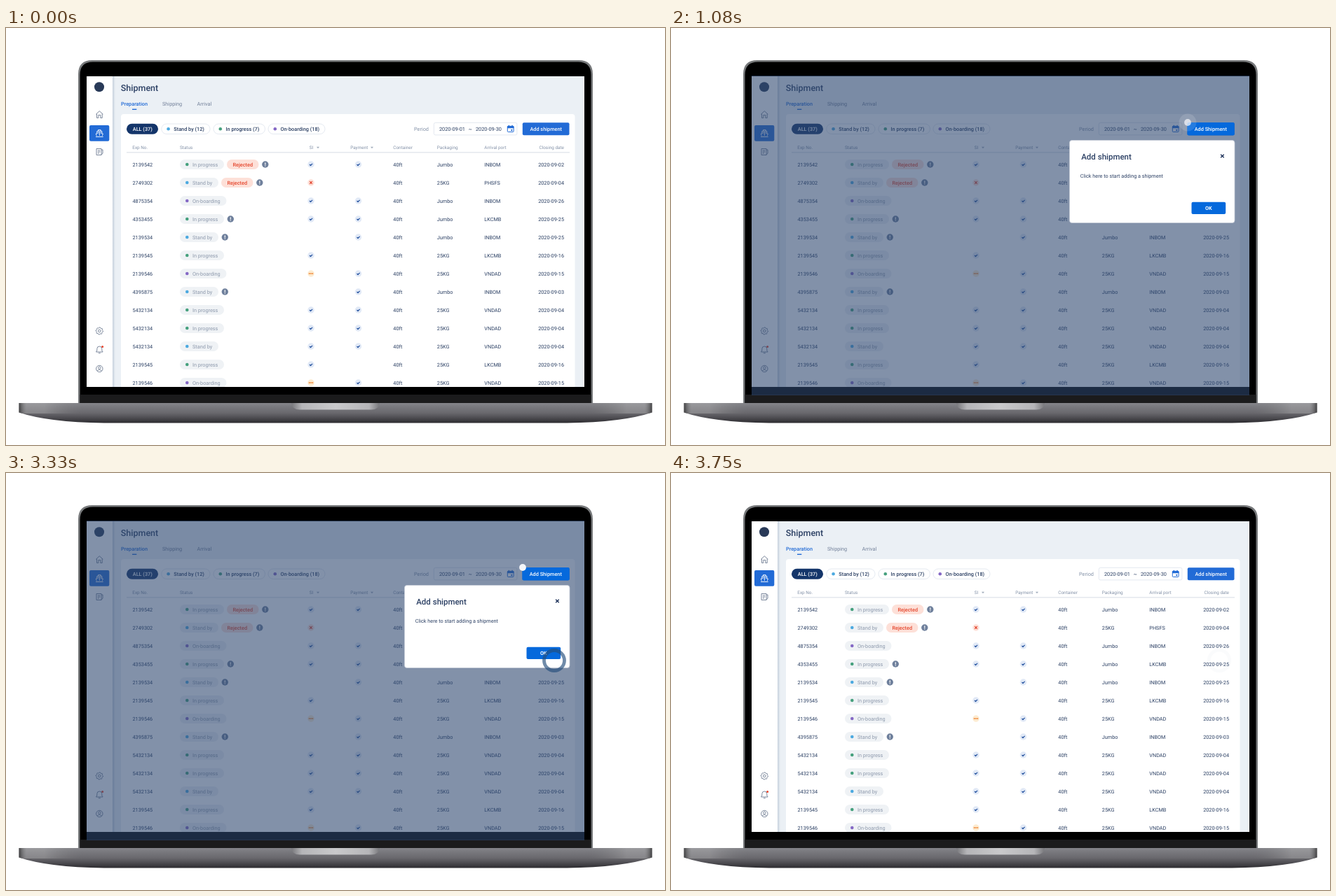
Animation, 940 px wide and 596 px high, one loop 5 s. Source, as an HTML page:

```html
<!DOCTYPE html>
<html lang="en">
<head>
<meta charset="utf-8">
<title>Shipment</title>
<style>
html, body { margin: 0; width: 100%; height: 100%; overflow: hidden; background: #fff; }
svg { display: block; width: 940px; height: 596px; }
text { font-family: Roboto, sans-serif; font-size: 7.3px; text-rendering: geometricPrecision; white-space: pre; }
</style>
</head>
<body>
<svg id="stage" viewBox="0 0 940 596">
  <defs>
    <linearGradient id="metal" x2="0" y2="1">
      <stop offset="0" stop-color="#85858a"/><stop offset=".15" stop-color="#7b7b80"/>
      <stop offset=".5" stop-color="#69686d"/><stop offset=".72" stop-color="#504f54"/>
      <stop offset="1" stop-color="#2d2c30"/>
    </linearGradient>
    <linearGradient id="sheen">
      <stop offset="0" stop-color="#222" stop-opacity=".65"/><stop offset=".012" stop-color="#ccc" stop-opacity=".3"/>
      <stop offset=".04" stop-color="#ccc" stop-opacity=".3"/><stop offset=".1" stop-color="#888" stop-opacity="0"/>
      <stop offset=".9" stop-color="#888" stop-opacity="0"/><stop offset=".96" stop-color="#ccc" stop-opacity=".3"/>
      <stop offset=".988" stop-color="#ccc" stop-opacity=".3"/><stop offset="1" stop-color="#222" stop-opacity=".65"/>
    </linearGradient>
    <linearGradient id="notch">
      <stop offset="0" stop-color="#77777b"/><stop offset=".12" stop-color="#b5b5b8"/>
      <stop offset=".5" stop-color="#c9c9cb"/><stop offset=".88" stop-color="#b5b5b8"/>
      <stop offset="1" stop-color="#77777b"/>
    </linearGradient>
    <linearGradient id="shade">
      <stop offset="0" stop-color="#c6d0dc"/><stop offset="1" stop-color="#ebf0f5"/>
    </linearGradient>
    <clipPath id="screen"><rect x="115" y="69" width="710" height="444"/></clipPath>
  </defs>
  <path d="M103 536V66Q103 46 123 46H817Q837 46 837 66V536Z" fill="#77797b"/>
  <path d="M105.5 536V67Q105.5 48.5 124 48.5H816Q834.5 48.5 834.5 67V536Z"/>
  <rect x="105.5" y="524" width="729" height="12" fill="#1b1b1c"/>
  <g id="base">
    <path id="body" d="M18.5 536H921.5V549.5Q880 563.5 800 564.5H140Q60 563.5 18.5 549.5Z" fill="url(#metal)"/>
    <path d="M18.5 536H921.5V549.5L917 551H23L18.5 549.5Z" fill="url(#sheen)"/>
    <path d="M407 536H533Q532 545.5 521 545.5H419Q408 545.5 407 536Z" fill="url(#notch)"/>
  </g>
  <g id="app" clip-path="url(#screen)"></g>
  <rect id="dim" x="115" y="68" width="710" height="457" fill="#304870"/>
  <g id="tip"></g>
  <circle id="tap" cx="782" cy="268" fill="none" stroke="#244e7c" stroke-width="4.8"/>
</svg>
<script>
const $ = id => document.getElementById(id);
const BLUE = '#226bd6', INK = '#2c4064', MUTED = '#8492a8', NAVY = '#14356a';

const rect = (x, y, w, h, r, fill, more = '') =>
  `<rect x="${x}" y="${y}" width="${w}" height="${h}" rx="${r}" fill="${fill}" ${more}/>`;
const dot = (x, y, r, fill, more = '') =>
  `<circle cx="${x}" cy="${y}" r="${r}" fill="${fill}" ${more}/>`;
const line = (d, color, w = 0.9) =>
  `<path d="${d}" fill="none" stroke="${color}" stroke-width="${w}" stroke-linejoin="round"/>`;
const text = (x, y, s, fill = INK, size = 7.3, weight = 400, anchor = 'start') =>
  `<text x="${x}" y="${y}" fill="${fill}" font-weight="${weight}" text-anchor="${anchor}" style="font-size:${size}px">${s}</text>`;
const cross = (x, y, r, color, w) =>
  line(`M${x - r} ${y - r}l${2 * r} ${2 * r}m0 ${-2 * r}l${-2 * r} ${2 * r}`, color, w);

const STATUS = {
  P: ['In progress', 63, '#45a07d'],
  S: ['Stand by', 55, '#4ba9e0'],
  O: ['On-boarding', 66.5, '#8468c5']
};

// number, status, flags (r: rejected, i: info), SI, payment, packaging, port, day
const ROWS = `2139542 P ri v v Jumbo INBOM 02
2749302 S ri x - 25KG PHSFS 04
4875354 O - v v Jumbo INBOM 26
4353455 P i v v Jumbo LKCMB 25
2139534 S i - v Jumbo INBOM 25
2139545 P - v - 25KG LKCMB 16
2139546 O - m v 25KG VNDAD 15
4395875 S i - v Jumbo INBOM 03
5432134 P - v v 25KG VNDAD 04
5432134 P - v v 25KG VNDAD 04
5432134 S - v v 25KG VNDAD 04
2139545 P - v - 25KG LKCMB 16
2139546 O - m v 25KG VNDAD 15`.split('\n').map(r => r.split(' '));

function mark(kind, x, y) {
  if (kind === 'v') return dot(x, y, 4.7, '#e1e9f6') + line(`M${x - 2} ${y}l1.5 1.5l2.6 -2.7`, '#24529f', 1.2);
  if (kind === 'x') return dot(x, y, 4.7, '#fde0d8') + cross(x, y, 1.8, '#e23f28', 1.2);
  if (kind === 'm') return dot(x, y, 4.7, '#fdebd0') + [-2.3, 0, 2.3].map(d => dot(x + d, y, 0.9, '#ee8030')).join('');
  return '';
}

function row([no, status, flags, si, pay, pack, port, day], i) {
  const y = 195 + 26 * i, base = y + 2.6;
  const [label, width, color] = STATUS[status];
  let end = 248 + width;
  let out = text(180.5, base, no) + rect(248, y - 7, width, 14, 7, '#eff2f5') +
    dot(258.3, y, 2.3, color) + text(266, base, label, '#8d99ac');
  if (flags.includes('r')) {
    out += rect(end + 4, y - 7, 45.5, 14, 7, '#fde0d8') +
      text(end + 26.8, base, 'Rejected', '#e5472e', 7.3, 500, 'middle');
    end += 49.5;
  }
  if (flags.includes('i')) {
    out += dot(end + 9.3, y, 4.7, '#6f809c') + rect(end + 8.7, y - 2.6, 1.2, 3.2, 0, '#fff') + dot(end + 9.3, y + 2, 0.7, '#fff');
  }
  return out + mark(si, 435, y) + mark(pay, 502.5, y) + text(552.3, base, '40ft') +
    text(614.8, base, pack) + text(682.3, base, port) + text(796, base, '2020-09-' + day, INK, 7.3, 400, 'end');
}

function chip(x, w, label, color) {
  return rect(x, 137, w, 14.5, 7.2, '#fff', 'stroke="#dde4ec" stroke-width=".8"') +
    dot(x + 9.8, 144.3, 2.3, color) + text(x + 17.5, 147, label, INK, 7.3, 500);
}

function sidebar() {
  const g = '#6f7c92';
  let teeth = '';
  for (let k = 0; k <= 32; k++) {
    const a = k * Math.PI / 16, r = k % 4 < 2 ? 5.2 : 4.2;
    teeth += `${k ? 'L' : 'M'}${(133.3 + r * Math.cos(a)).toFixed(2)} ${(433 + r * Math.sin(a)).toFixed(2)}`;
  }
  return rect(152, 69, 4, 444, 0, 'url(#shade)') + rect(115, 69, 37, 444, 0, '#fff') +
    dot(133, 84.3, 7, '#293a58') +
    line('M128.3 123.3L133.3 118.7L138.3 123.3M129.5 122.5V128.5H131.8V124.5H134.8V128.5H137.2V122.5', g) +
    rect(119, 139, 28.3, 22.8, 2, BLUE) +
    line('M129.8 150V147.5H136.8V150M131.5 147.5V145.6H135.1V147.5M129.3 154.2L128.3 151L133.3 149.2L138.3 151L137.3 154.2M133.3 149.5V154M128 155.5H138.6', '#fff') +
    line('M129 172.5H136V181.5H129ZM136 174H138V179L135.8 181.5M130.8 175H134.3M130.8 177H134.3M130.8 179H133', g) +
    line(teeth, g) + dot(133.3, 433, 1.8, 'none', `stroke="${g}" stroke-width=".9"`) +
    line('M128.5 463H138.1L136.8 461V458.5A3.5 3.5 0 0 0 129.8 458.5V461ZM131.8 464.7H134.8', g) +
    dot(137.6, 455.5, 1.5, '#e8452c') +
    dot(133.3, 487, 4.7, 'none', `stroke="${g}" stroke-width=".9"`) +
    dot(133.3, 485.7, 1.7, 'none', `stroke="${g}" stroke-width=".9"`) +
    line('M130 490.2Q133.3 486.8 136.6 490.2', g);
}

function header() {
  const h = (x, s, anchor) => text(x, 173.2, s, MUTED, 6.4, 400, anchor);
  const arrow = x => `<path d="M${x - 2} 169.7h4l-2 2.6z" fill="#a3aebd"/>`;
  return h(180.3, 'Exp No.') + h(248, 'Status') + h(432.7, 'SI') + arrow(445) +
    h(491.2, 'Payment') + arrow(522) + h(552.3, 'Container') + h(614.8, 'Packaging') +
    h(682.3, 'Arrival port') + h(796, 'Closing date', 'end') + rect(172, 177.5, 632, 0.8, 0, '#ccd4de');
}

function filters() {
  return rect(172, 136.8, 45, 15, 7.5, NAVY) + text(194.8, 147, 'ALL (37)', '#fff', 7.3, 500, 'middle') +
    chip(221.8, 69.2, 'Stand by (12)', STATUS.S[2]) + chip(296, 73.5, 'In progress (7)', STATUS.P[2]) +
    chip(374, 81, 'On-boarding (18)', STATUS.O[2]) +
    text(582, 146.8, 'Period', MUTED) +
    rect(610.4, 135.4, 118.5, 17.5, 2, '#fff', 'stroke="#dde4ec" stroke-width=".8"') +
    text(618, 146.8, '2020-09-01') + text(659.7, 146.8, '~') + text(670, 146.8, '2020-09-30') +
    rect(715.3, 140.3, 8.8, 8.2, 1, '#fff', `stroke="${BLUE}"`) + rect(715, 140, 9.4, 3.2, 1, BLUE) +
    rect(716.7, 138.8, 1.2, 2, 0, BLUE) + rect(721.5, 138.8, 1.2, 2, 0, BLUE) + rect(720.3, 145, 2, 2, 0, BLUE) +
    rect(736.8, 135.2, 66.7, 18, 2, BLUE) + text(770.2, 147, 'Add shipment', '#fff', 7.3, 500, 'middle');
}

$('app').innerHTML = rect(115, 69, 710, 444, 0, '#ebf0f5') + sidebar() +
  text(163.8, 90.3, 'Shipment', INK, 12.5, 500) +
  text(164, 111.4, 'Preparation', BLUE, 7.3, 500) + rect(180, 115.6, 6.3, 1.4, 0, BLUE) +
  text(223, 111.4, 'Shipping', '#73819a') + text(272.5, 111.4, 'Arrival', '#73819a') +
  rect(164, 123, 647.5, 400, 4, '#fff') + filters() + header() + ROWS.map(row).join('');

const ACTION = '#0569dc';
$('tip').innerHTML = rect(736.3, 135, 67.5, 18.4, 2, ACTION) +
  text(769.8, 147, 'Add Shipment', '#fff', 7.3, 500, 'middle') +
  rect(568.5, 160.5, 235.5, 118, 3.5, '#fff', 'stroke="#c3cad6" stroke-width=".8"') +
  text(585.2, 188.2, 'Add shipment', INK, 11.5, 500) + cross(786.4, 183, 2.3, '#1e335a', 1.4) +
  text(583.8, 213.6, 'Click here to start adding a shipment', INK, 7.25) +
  rect(742.5, 248.8, 48.7, 17.2, 2, ACTION) + text(766.8, 260.2, 'OK', '#fff', 7.3, 700, 'middle') +
  dot(737, 135, 5, '#fff', 'id="halo"') + dot(737, 135, 4.9, '#f4f6f9', 'id="beacon"');

// piecewise-linear value from time, value pairs
function key(t, ...k) {
  if (t <= k[0]) return k[1];
  for (let i = 2; i < k.length; i += 2) {
    if (t < k[i]) return k[i - 1] + (k[i + 1] - k[i - 1]) * (t - k[i - 2]) / (k[i] - k[i - 2]);
  }
  return k[k.length - 1];
}

function draw(t) {
  $('dim').setAttribute('opacity', t < 420 ? 0 :
    key(t, 420, .1, 500, .58, 540, .6, 3420, .6, 3540, .54, 3710, .06, 3750, 0));
  $('tip').style.display = t >= 540 && t < 3440 ? '' : 'none';

  const since = (t - 710) % 1390;
  const p = t < 710 || since > 500 ? 0 : since / 500;
  $('halo').setAttribute('r', 5 + 10 * p);
  $('halo').setAttribute('opacity', p ? .5 * (1 - p) : 0);
  $('beacon').setAttribute('opacity', t < 710 ? 1 : key(since, 0, 1, 400, .72, 570, .84, 740, 1));

  $('tap').setAttribute('r', key(t, 2960, 2.4, 3340, 14.8));
  $('tap').setAttribute('opacity', key(t, 2960, 0, 3200, .65, 3540, .65, 3750, .02));
}

const start = performance.now();
function tick(now) {
  draw(Math.max(0, now - start) % 5000);
  requestAnimationFrame(tick);
}
draw(0);
requestAnimationFrame(tick);
</script>
</body>
</html>
```
